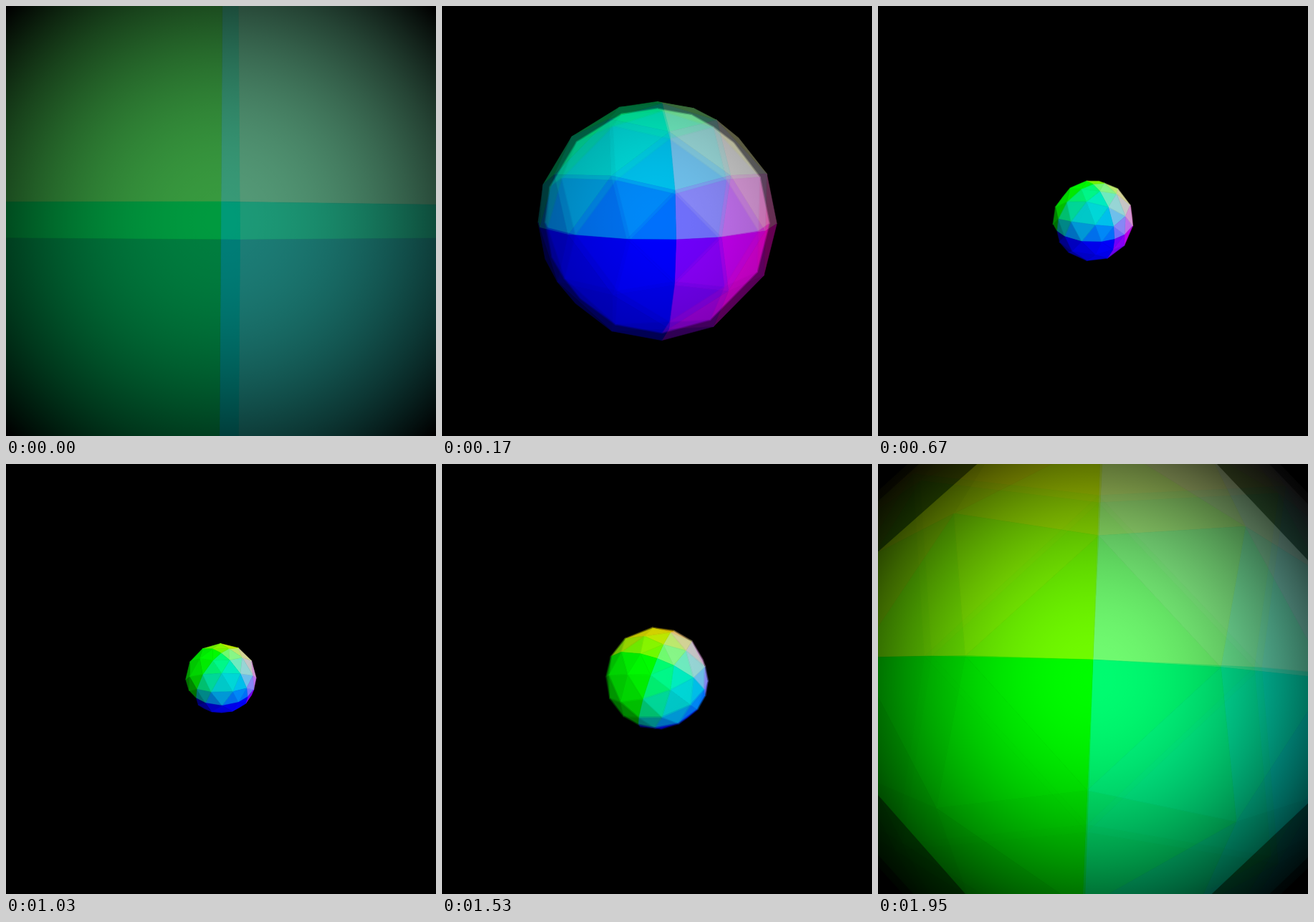
Animation, 600 px wide and 600 px high, one loop 1.98 s. Source, as an HTML page with a canvas:

```html
<!DOCTYPE html>
<html>
<head>
<meta charset="utf-8">
<style>
  html, body { margin: 0; width: 100%; height: 100%; overflow: hidden; background: #000; }
  canvas { display: block; }
</style>
</head>
<body>
<canvas id="stage" width="600" height="600"></canvas>
<script>
const SIZE = 600, LOOP = 1980, STEP = 41.7, LAST = 47;
const PERIOD = 48.18;                    // steps per quarter turn
const FOCAL = 300 / Math.tan(25 * Math.PI / 180);
const TRAVEL = 12.1, NEAR = 0.1, CX = 300, CY = 299.5;
// Exposure samples: [offset in steps, weight]
const SHUTTER = [[-0.2, 0.5], [0.1, 0.25], [0.15, 0.25]];

const stage = document.getElementById('stage').getContext('2d');
const layer = document.createElement('canvas');
layer.width = layer.height = SIZE;
const pen = layer.getContext('2d');
pen.lineWidth = 0.6;
pen.lineJoin = 'round';

const dot = (a, b) => a[0] * b[0] + a[1] * b[1] + a[2] * b[2];
const sub = (a, b) => a.map((v, i) => v - b[i]);
const unit = a => a.map(v => v / Math.hypot(...a));
const cross = (a, b) => [
  a[1] * b[2] - a[2] * b[1], a[2] * b[0] - a[0] * b[2], a[0] * b[1] - a[1] * b[0]
];
const srgb = v => v <= 0.0031308 ? 12.92 * Math.max(v, 0) : 1.055 * v ** (1 / 2.4) - 0.055;

function makeFace(points) {
  const [a, b, c] = points.map(unit);
  let normal = unit(cross(sub(b, a), sub(c, a)));
  if (dot(normal, a) < 0) normal = normal.map(v => -v);
  const color = `rgb(${normal.map(v => Math.round(255 * srgb(v)))})`;
  return { points: [a, b, c], normal, color };
}

// Octahedron with every edge split in four, pushed out to the unit sphere
function makeSphere() {
  const faces = [];
  const up = [[1, 0, 0], [0, 1, 0], [0, 0, 1]];
  const down = [[1, 1, 0], [0, 1, 1], [1, 0, 1]];
  for (let octant = 0; octant < 8; octant++) {
    const sign = [0, 1, 2].map(i => octant >> i & 1 ? -1 : 1);
    for (const [total, corners] of [[3, up], [2, down]])
      for (let i = 0; i <= total; i++)
        for (let j = 0; i + j <= total; j++) {
          const base = [i, j, total - i - j];
          faces.push(makeFace(corners.map(c => c.map((v, n) => (v + base[n]) * sign[n]))));
        }
  }
  return faces;
}
const sphere = makeSphere();

// Turn about y, then about x, by the same angle
function turn([x, y, z], s, c) {
  const side = x * c + z * s, depth = z * c - x * s;
  return [side, y * c - depth * s, y * s + depth * c];
}

function drawSphere(phase) {
  pen.fillStyle = '#000';
  pen.fillRect(0, 0, SIZE, SIZE);
  const p = (phase + 1) % 1;
  const dist = 1 + TRAVEL * Math.sin(Math.PI * p);
  if (dist - 1 < NEAR) return;
  const s = Math.sin(p * Math.PI / 2), c = Math.cos(p * Math.PI / 2);
  const eye = [0, 0, dist];
  for (const face of sphere) {
    const pts = face.points.map(v => turn(v, s, c));
    if (dot(turn(face.normal, s, c), sub(eye, pts[0])) <= 0) continue;
    pen.beginPath();
    for (const [x, y, z] of pts) {
      const k = FOCAL / (dist - z);
      pen.lineTo(CX + x * k, CY - y * k);
    }
    pen.closePath();
    pen.fillStyle = pen.strokeStyle = face.color;
    pen.fill();
    pen.stroke();
  }
}

const vignette = stage.createRadialGradient(300, 300, 0, 300, 300, 420);
for (let i = 0; i <= 16; i++)
  vignette.addColorStop(i / 16, `rgba(0,0,0,${(i / 16) ** 2})`);

function draw(time) {
  const step = Math.min(LAST, Math.floor((time % LOOP + 16) / STEP));
  stage.globalCompositeOperation = 'source-over';
  stage.fillStyle = '#000';
  stage.fillRect(0, 0, SIZE, SIZE);
  stage.globalCompositeOperation = 'lighter';
  for (const [offset, weight] of SHUTTER) {
    drawSphere((step + offset) / PERIOD);
    stage.globalAlpha = weight;
    stage.drawImage(layer, 0, 0);
  }
  stage.globalAlpha = 1;
  stage.globalCompositeOperation = 'source-over';
  stage.fillStyle = vignette;
  stage.fillRect(0, 0, SIZE, SIZE);
}

let start;
function tick(now) {
  start ??= now;
  draw(now - start);
  requestAnimationFrame(tick);
}
draw(0);
requestAnimationFrame(tick);
</script>
</body>
</html>
```
